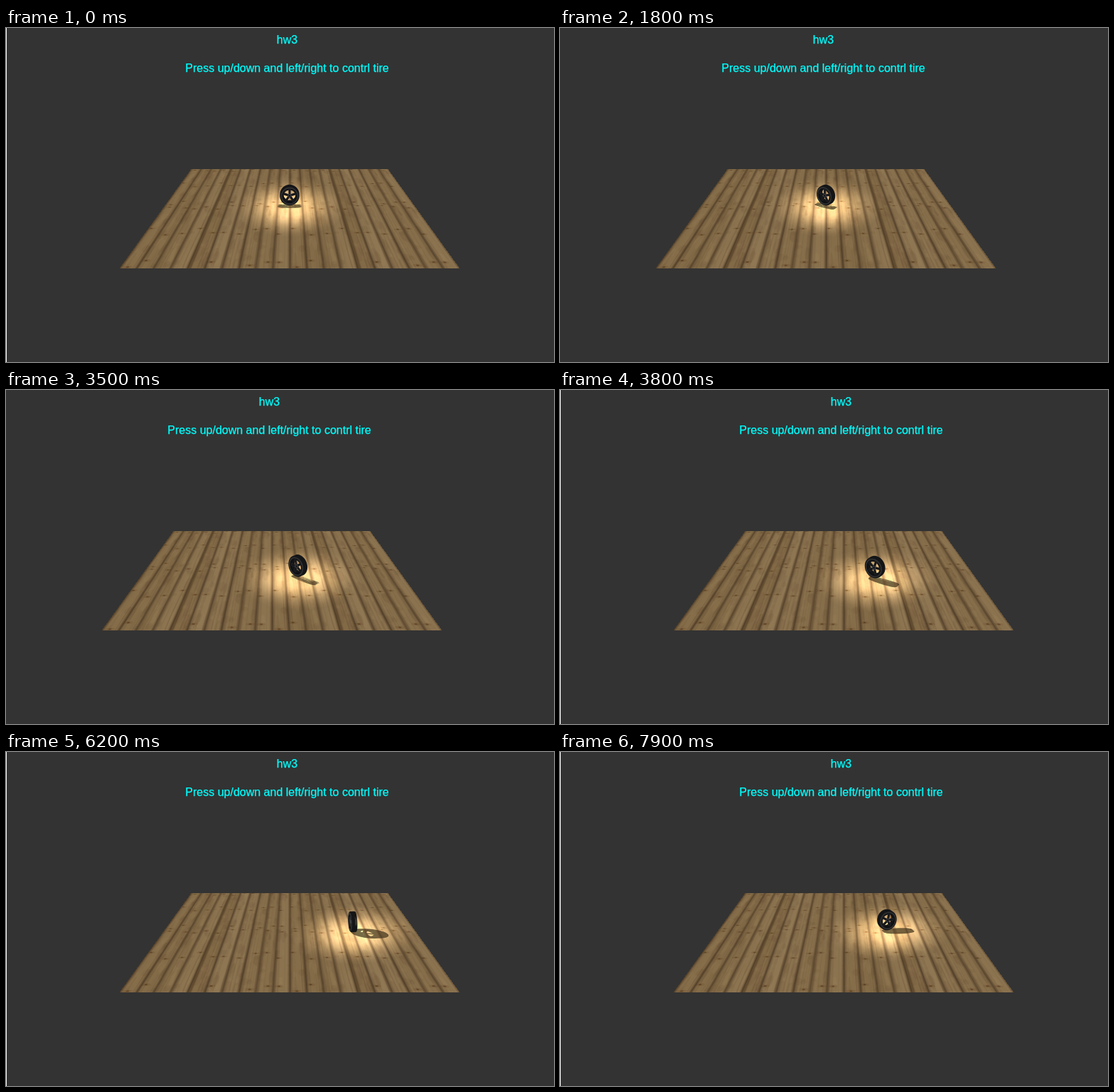
An HTML page with a canvas for the animation above (8 s loop, 771 px wide and 471 px high).

```html
<!DOCTYPE html>
<html lang="en">
<head>
<meta charset="utf-8">
<title>hw3</title>
<style>
  html, body { margin: 0; width: 100%; height: 100%; overflow: hidden; background: #333; }
  canvas { position: absolute; left: 0; top: 0; }
  #caption {
    position: absolute; left: 235px; top: 7px; width: 321px;
    font: 16px/20px "Liberation Sans", Arial, sans-serif;
    color: #0ff; -webkit-text-stroke: .25px #0ff;
    text-align: center; white-space: nowrap;
  }
  #caption div + div { margin-top: 20px; }
</style>
</head>
<body>
<canvas id="stage" width="771" height="471"></canvas>
<div id="caption"><div>hw3</div><div>Press up/down and left/right to contrl tire</div></div>
<script>
const LOOP = 8000, STEP = 100;
const CENTER_X = 399, HORIZON = 9.3, EYE = 240.7, DEPTH = 648;
const FLOOR = { top: 199, bottom: 339, farWidth: 277, nearWidth: 479 };
const TIRE = { radius: 13.7, hole: 8.8, width: 8, lift: .8 };
const LAMP = { height: 86, z: -9 };

// time, x, z, heading in degrees
const PATH = [
  [1200, 0, 0, 0], [1900, 0, 0, 40], [2700, 16.5, 16.5, 40],
  [3600, 37, 35, 42], [3800, 41.5, 38, 31], [4350, 57, 41, -4],
  [4900, 73.5, 38, -40], [5600, 84, 26, -65], [6200, 87.5, 10.6, -92],
  [6900, 80, 1.5, -137], [7400, 70, 1.5, -170], [7900, 60.7, 2.7, -200]
];
// time, horizontal page offset
const SCROLL = [[0, 0], [1200, -8], [1300, -25], [3600, -17], [3700, 0]];

const ctx = document.getElementById('stage').getContext('2d');
const caption = document.getElementById('caption');

function seeded(seed) {
  return () => {
    seed = (seed * 1664525 + 1013904223) >>> 0;
    return seed / 4294967296;
  };
}

function makeCanvas(width, height) {
  const canvas = document.createElement('canvas');
  canvas.width = width;
  canvas.height = height;
  return canvas;
}

function makePlanks() {
  const size = 400, plank = size / 10, random = seeded(37);
  const tile = makeCanvas(size, size), g = tile.getContext('2d');
  const blot = (x, y, rx, ry, color) => {
    g.fillStyle = color;
    g.beginPath();
    g.ellipse(x, y, rx, ry, 0, 0, 7);
    g.fill();
  };
  for (let i = 0; i < 10; i++) {
    const x = i * plank, tone = random() * 12 - 6;
    g.save();
    g.beginPath();
    g.rect(x, 0, plank, size);
    g.clip();
    g.fillStyle = `rgb(${136 + tone},${112 + tone},${77 + tone})`;
    g.fillRect(x, 0, plank, size);
    for (let k = 0; k < 22; k++) {
      const shade = random() < .5 ? '165,142,102' : '88,64,38';
      blot(x + random() * plank, random() * size, 2 + random() * 8, 8 + random() * 45, `rgba(${shade},.1)`);
    }
    for (let k = 0; k < 6; k++) {
      const gx = x + random() * plank, bend = random() * 10 - 5;
      g.strokeStyle = `rgba(70,50,28,${.06 + random() * .12})`;
      g.lineWidth = 1 + random() * 2;
      g.beginPath();
      g.moveTo(gx, 0);
      g.bezierCurveTo(gx + bend, 130, gx - bend, 270, gx, size);
      g.stroke();
    }
    for (const row of [8, 198, 385]) {
      const kx = x + 8 + random() * 24, ky = row + random() * 50 - 25;
      blot(kx, ky, 11, 7, 'rgba(106,68,34,.22)');
      blot(kx, ky, 3.5, 3.5, 'rgba(64,42,22,.5)');
    }
    const gap = g.createLinearGradient(x, 0, x + plank, 0), dark = .5 + random() * .25;
    gap.addColorStop(0, `rgba(50,35,21,${dark})`);
    gap.addColorStop(.14, 'rgba(60,42,25,.2)');
    gap.addColorStop(.28, 'rgba(60,42,25,0)');
    gap.addColorStop(.85, 'rgba(60,42,25,0)');
    gap.addColorStop(1, 'rgba(50,35,21,.5)');
    g.fillStyle = gap;
    g.fillRect(x, 0, plank, size);
    g.restore();
  }
  const planks = makeCanvas(size * 2, size * 2), p = planks.getContext('2d');
  p.fillStyle = p.createPattern(tile, 'repeat');
  p.fillRect(0, 0, size * 2, size * 2);
  return planks;
}

// Lays the flat planks out row by row in perspective.
function makeFloor() {
  const planks = makePlanks(), floor = makeCanvas(771, 471), g = floor.getContext('2d');
  const { top, bottom, farWidth, nearWidth } = FLOOR;
  const widthAt = y => farWidth + (nearWidth - farWidth) * (y - top) / (bottom - top);
  const rowAt = y => planks.height * (1 / farWidth - 1 / widthAt(y)) / (1 / farWidth - 1 / nearWidth);
  g.imageSmoothingQuality = 'high';
  for (let y = top; y < bottom; y++) {
    const w = widthAt(y + .5), from = rowAt(y);
    g.drawImage(planks, 0, from, planks.width, rowAt(y + 1) - from, CENTER_X - w / 2, y, w, 1);
  }
  return floor;
}

const floor = makeFloor();

function project([x, y, z]) {
  const s = DEPTH / (DEPTH - z);
  return [CENTER_X + x * s, HORIZON + (EYE - y) * s, s];
}

function castShadow([x, y, z]) {
  const k = LAMP.height / (LAMP.height - y);
  return project([x * k, 0, LAMP.z + (z - LAMP.z) * k]);
}

function poseAt(time) {
  let rolled = 0, prev = PATH[0];
  if (time <= prev[0]) return { x: 0, z: 0, heading: 0, roll: 0 };
  for (const next of PATH.slice(1)) {
    const k = Math.min(1, (time - prev[0]) / (next[0] - prev[0]));
    const [, x, z, deg] = prev.map((v, i) => v + (next[i] - v) * k);
    rolled += Math.hypot(x - prev[1], z - prev[2]);
    if (k < 1 || next === PATH[PATH.length - 1]) {
      return { x, z, heading: deg * Math.PI / 180, roll: -rolled / TIRE.radius };
    }
    prev = next;
  }
}

// Maps (radius, angle, offset along the axle) on the wheel to a world point.
function wheelSpace({ x, z, heading }) {
  const c = Math.cos(heading), s = Math.sin(heading);
  const side = s * x + c * (DEPTH - z) >= 0 ? 1 : -1;
  return (r, angle, offset) => {
    const along = r * Math.cos(angle), out = offset * side;
    const height = TIRE.radius + TIRE.lift + r * Math.sin(angle);
    return [x + along * c - out * s, height, z + along * s + out * c];
  };
}

function addPolygon(path, points) {
  points.forEach(([x, y], i) => i ? path.lineTo(x, y) : path.moveTo(x, y));
  path.closePath();
}

function ring(place, r, offset, direction = 1) {
  return Array.from({ length: 36 }, (_, i) => place(r, direction * i * Math.PI / 18, offset));
}

function spokes(place, roll, offset) {
  return Array.from({ length: 5 }, (_, i) => {
    const a = roll + Math.PI / 2 + i * Math.PI * .4;
    return [[2.5, -.6], [9, -.16], [9, .16], [2.5, .6]].map(([r, d]) => place(r, a + d, offset));
  });
}

function tirePath(place, roll, view) {
  const path = new Path2D(), add = points => addPolygon(path, points.map(view));
  for (let i = 0; i <= 8; i++) {
    const offset = (i / 8 - .5) * TIRE.width;
    const edge = i === 0 || i === 8 ? .6 : 0;
    add(ring(place, TIRE.radius - edge, offset));
    add(ring(place, TIRE.hole, offset, -1));
  }
  for (const offset of [2, 3]) {
    spokes(place, roll, offset).forEach(add);
    add(ring(place, 2.8, offset));
  }
  return path;
}

function drawLight(pose) {
  const [x, y, s] = project([pose.x * 1.03, 0, pose.z]);
  const { top, bottom, farWidth, nearWidth } = FLOOR;
  ctx.save();
  ctx.beginPath();
  ctx.moveTo(CENTER_X - farWidth / 2, top);
  ctx.lineTo(CENTER_X + farWidth / 2, top);
  ctx.lineTo(CENTER_X + nearWidth / 2, bottom);
  ctx.lineTo(CENTER_X - nearWidth / 2, bottom);
  ctx.clip();
  ctx.globalCompositeOperation = 'color-dodge';
  ctx.translate(x, y + 3);
  ctx.scale((78 + pose.x * .12) * s, 42 * s);
  const glow = ctx.createRadialGradient(0, 0, 0, 0, 0, 1);
  glow.addColorStop(0, '#909090');
  glow.addColorStop(.3, '#848484');
  glow.addColorStop(.5, '#666');
  glow.addColorStop(.7, '#363636');
  glow.addColorStop(.88, '#101010');
  glow.addColorStop(1, '#000');
  ctx.fillStyle = glow;
  ctx.fillRect(-1, -1, 2, 2);
  ctx.restore();
}

function drawTire(pose) {
  const place = wheelSpace(pose), face = TIRE.width / 2;
  ctx.fillStyle = 'rgba(64,50,28,.72)';
  ctx.fill(tirePath(place, pose.roll, castShadow));
  ctx.fillStyle = '#141517';
  ctx.fill(tirePath(place, pose.roll, project));
  const outline = (points, color, width) => {
    const path = new Path2D();
    addPolygon(path, points.map(project));
    ctx.strokeStyle = color;
    ctx.lineWidth = width;
    ctx.stroke(path);
  };
  outline(ring(place, 11.4, face), '#303132', 1.6);
  outline(ring(place, 8.8, face), '#0b0c0e', 1);
  outline(ring(place, 2, 3), '#55585a', .8);
  for (const spoke of spokes(place, pose.roll, 3)) outline(spoke, 'rgba(76,78,82,.7)', .4);
}

function draw(time) {
  const shift = SCROLL.filter(([start]) => start <= time).pop()[1];
  const pose = poseAt(time);
  caption.style.transform = `translateX(${shift}px)`;
  ctx.setTransform(1, 0, 0, 1, 0, 0);
  ctx.fillStyle = '#333';
  ctx.fillRect(0, 0, 771, 471);
  ctx.translate(shift, 0);
  ctx.fillStyle = '#fff';
  ctx.fillRect(0, 0, 1, 471);
  ctx.drawImage(floor, 0, 0);
  drawLight(pose);
  drawTire(pose);
}

const start = performance.now();
function tick() {
  const time = (performance.now() - start) % LOOP;
  draw(Math.floor(time / STEP) * STEP);
  requestAnimationFrame(tick);
}
tick();
</script>
</body>
</html>
```
